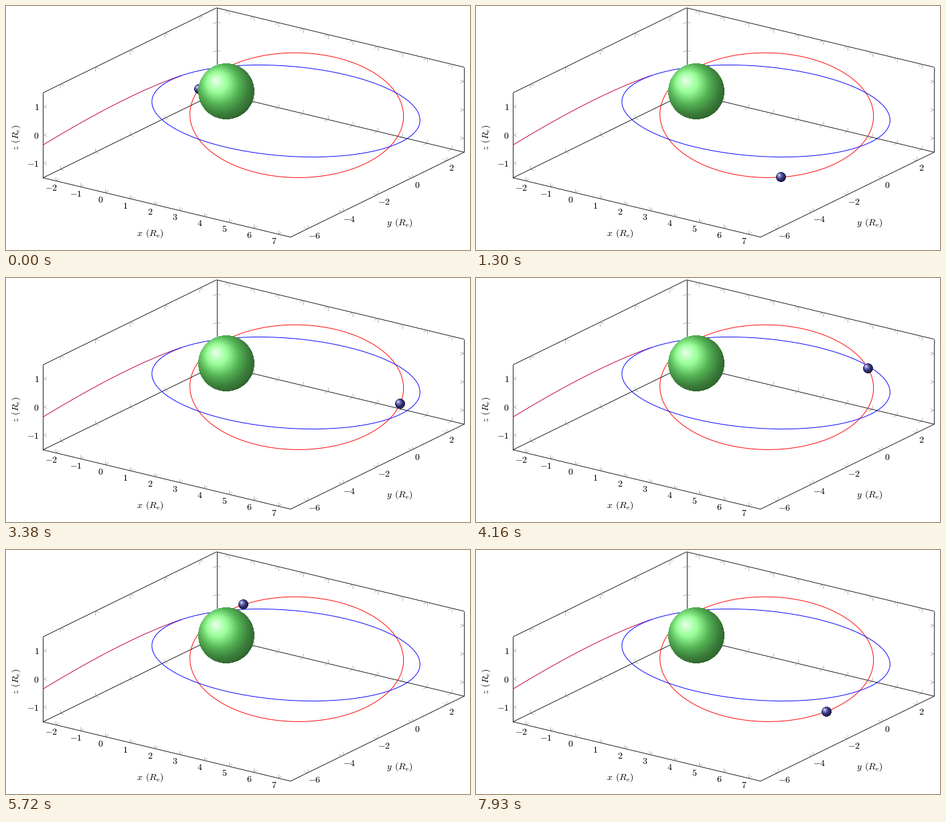
A matplotlib script for the animation above (8000 ms loop, 693 by 366 pixels).

```python
from itertools import product

import numpy as np
import matplotlib.pyplot as plt
from matplotlib.animation import FuncAnimation

plt.rcParams["mathtext.fontset"] = "cm"

W, H, DPI = 693, 366, 100
PX = 72 / DPI                       # one pixel in points
LOOP, TICK, STEP = 8000, 20, 130    # ms

fig = plt.figure(figsize=(W / DPI, H / DPI), dpi=DPI, facecolor="white")
ax = fig.add_axes([0, 0, 1, 1])
ax.axis("off")

# Oblique view: each data axis as a pixel vector
LO, HI = np.array([-2.5, -7, -1.5]), np.array([7.5, 3, 1.5])
AXES = np.array([[36.97, 8.9], [25.93, -12.74], [0, -42.5]])
CORNER = np.array([55.3, 257.7])
MARKS = [range(-2, 8), range(-6, 3, 2), range(-1, 2)]


def project(p):
    return CORNER + (np.asarray(p) - LO) @ AXES


def line(points, color, width, z):
    x, y = np.transpose(points)
    ax.plot(x, y, color=color, lw=width * PX, zorder=z, solid_capstyle="butt")


def label(x, y, text, **kw):
    kw = {"ha": "center", "va": "center", **kw}
    ax.text(x, y, f"${text}$", fontsize=10, color="black", **kw)


def draw_edge(axis, start):
    p = np.where(start, HI, LO)
    q = p.copy()
    q[axis] = HI[axis]
    line([project(p), project(q)], "black", 0.85, 1)
    for v in MARKS[axis]:
        p[axis] = v
        foot = project(p)
        for other in {0, 1, 2} - {axis}:
            d = AXES[other] * (1 - 2 * start[other])
            line([foot, foot + 6 * d / np.hypot(*d)], "0.5", 0.55, 1)


# Box without the three edges that meet in the nearest corner
NEAREST = (1, 0, 1)
for axis, start in product(range(3), product((0, 1), repeat=3)):
    end = start[:axis] + (1,) + start[axis + 1:]
    if not start[axis] and NEAREST not in (start, end):
        draw_edge(axis, start)

for v in MARKS[0]:
    x, y = project((v, LO[1], LO[2]))
    label(x - 6.6, y + 10.8, v)
for v in MARKS[1]:
    x, y = project((HI[0], v, LO[2]))
    label(x + (9.8 if v < 0 else 7.2), y + 11.3, v)
for v in MARKS[2]:
    x, y = project((LO[0], LO[1], v))
    label(x - 5.6, y + 0.9, v, ha="right")

UNIT = r"\;\,(R_{\mathrm{e}})"
label(215.5, 341.5, "x" + UNIT)
label(587.3, 325, "y" + UNIT)
label(15.5, 197.5, "z" + UNIT, rotation=90)


# Orbits
def ellipse(theta, cx, cy, a, b, skew):
    c, s = np.cos(theta), np.sin(theta)
    return np.stack([cx + a * c, cy + b * (skew * c + np.sqrt(1 - skew**2) * s)], -1)


RED = (434.2, 163.8, 159.5, 93.6, 0.015)
BLUE = (418.1, 157.5, 200.2, 69, 0.2)
turn = np.linspace(0, 2 * np.pi, 400)
line(ellipse(turn, *RED), "red", 0.95, 2)
line(ellipse(turn, *BLUE), "blue", 0.95, 4)

# Approach path, tangent to the blue orbit
t = np.linspace(0, 1, 80)[:, None]
p = np.array([[55.3, 208.5], [130, 162.9], [203, 124.2], [262.5, 104.1]])
line((1 - t)**3 * p[0] + 3 * t * (1 - t)**2 * p[1]
     + 3 * t**2 * (1 - t) * p[2] + t**3 * p[3], (0.75, 0, 0.25), 0.95, 3)


# Shaded balls
def ball(size, color):
    """Gradient of circles growing from an off-centre highlight."""
    c = (np.arange(size) + 0.5) * 2 / size - 1
    x, y = np.meshgrid(c, c)
    o = -0.4
    k = 1 - o * o / 2
    qx, qy = x - o, y - o
    dot = o * (qx + qy)
    r = (dot + np.sqrt(dot**2 + 4 * k * (qx**2 + qy**2))) / (2 * k)
    stops = [0, 0.36, 0.72, 1, 2]
    white = np.interp(r, stops, [0.85, 0.25, 0, 0, 0])
    tint = np.interp(r, stops, [0.15, 0.75, 0.7, 0.5, 0])
    rgb = [255 * white + tint * ch for ch in color]
    return np.dstack(rgb + [255 * (np.hypot(x, y) <= 1)]).astype(np.uint8)


def box(cx, cy, size):
    x, y = round(cx - size / 2), round(cy - size / 2)
    return x, x + size, y + size, y


def place(img, cx, cy, z):
    return ax.imshow(img, extent=box(cx, cy, len(img)), origin="upper",
                     aspect="auto", interpolation="nearest", zorder=z)


place(ball(84, (120, 255, 120)), 329, 128, 9)
MOON = 15
moon = place(ball(MOON, (72, 72, 168)), 288, 125, 8)
ax.set_xlim(0, W)
ax.set_ylim(H, 0)

PERIOD, ECC, PERIAPSIS = 45.35, 0.76, 210.1    # steps, -, degrees


def position(step):
    m = (2 * np.pi * step / PERIOD + np.pi) % (2 * np.pi) - np.pi
    e = m + 0.85 * ECC * np.sign(m)
    for _ in range(20):             # Kepler's equation
        e -= (e - ECC * np.sin(e) - m) / (1 - ECC * np.cos(e))
    # Periodic lead caused by the tilted orbit plane
    lead = (8.3 + 2.4 * np.cos(e) - 4.4 * np.cos(2 * e)
            + 0.7 * np.sin(e) + 1.9 * np.sin(3 * e))
    return ellipse(np.radians(PERIAPSIS - lead) - e, *RED)


def draw(i):
    step = (i * TICK + TICK - 1) // STEP
    moon.set_extent(box(*position(step), MOON))
    ax.set_xlim(0, W)
    ax.set_ylim(H, 0)
    return [moon]


anim = FuncAnimation(fig, draw, frames=LOOP // TICK, interval=TICK,
                     repeat=True, repeat_delay=0, blit=False)
plt.show()
```
